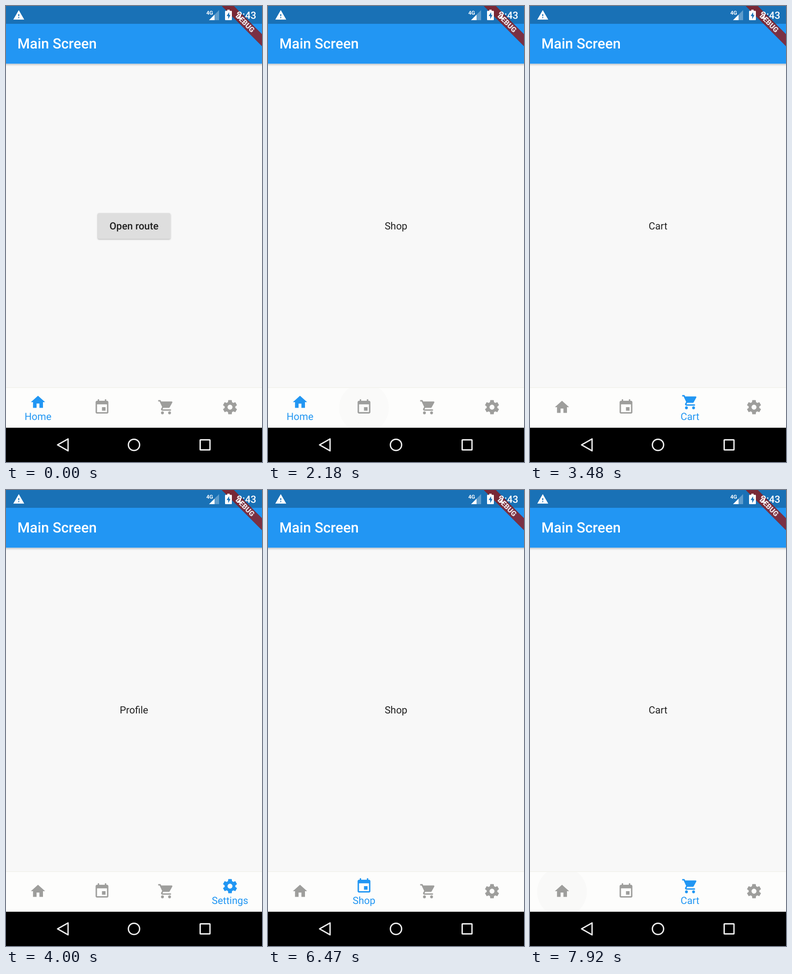
Write an HTML page that moves like this. It is 561 px wide and 998 px high and loops after 8 s.

```html
<!DOCTYPE html>
<html lang="en">
<head>
<meta charset="utf-8">
<title>Bottom navigation</title>
<style>
  html, body { margin: 0; width: 100%; height: 100%; overflow: hidden; background: #000; }
  svg { display: block; width: 100%; height: 100%; font: 21.82px Roboto, sans-serif; text-rendering: geometricPrecision; }
  .medium { font-weight: 500; }
  .title { font-size: 31.17px; font-weight: 500; fill: #fff; }
  .middle { text-anchor: middle; }
  .body { fill: #202020; }
</style>
</head>
<body>
<svg viewBox="0 0 561 998">
  <defs>
    <filter id="barShadow" x="-5%" y="-20%" width="110%" height="150%">
      <feDropShadow dx="0" dy="2" stdDeviation="2" flood-opacity=".26"/>
    </filter>
    <filter id="buttonShadow" x="-10%" y="-20%" width="120%" height="150%">
      <feDropShadow dx="0" dy="1.5" stdDeviation="1.4" flood-opacity=".32"/>
    </filter>
    <clipPath id="app"><rect width="561" height="923"/></clipPath>
    <clipPath id="navClip"><rect y="836" width="561" height="87"/></clipPath>

    <g id="page">
      <rect width="561" height="923" fill="#f8f8f8"/>
      <rect x="-10" width="581" height="126.2" fill="#2196f3" filter="url(#barShadow)"/>
      <rect width="561" height="39" fill="#1971b6"/>
    </g>
    <rect id="button" x="201" y="453.3" width="159.3" height="56" rx="3" fill="#dedede" filter="url(#buttonShadow)"/>

    <path id="home" d="M10 20v-6h4v6h5v-8h3L12 3 2 12h3v8z"/>
    <path id="shop" d="M17 12h-5v5h5zM16 1v2H8V1H6v2H5c-1.1 0-2 .9-2 2v14c0 1.1.9 2 2 2h14c1.1 0 2-.9 2-2V5c0-1.1-.9-2-2-2h-1V1zm3 18H5V8h14z"/>
    <g id="cart">
      <path d="M1 2v2h2l3.6 7.6L5.25 14C4.5 15.4 5.5 17 7 17h12v-2H7.4c-.2 0-.3-.2-.2-.4L8.1 13h7.45c.75 0 1.4-.4 1.75-1l3.6-6.5C21.25 4.8 20.75 4 20 4H5.2l-.93-2z"/>
      <circle cx="7" cy="20" r="2"/><circle cx="17" cy="20" r="2"/>
    </g>
    <path id="tooth" d="M10 2h4q.45 0 .5.4l.6 4.6H8.9l.6-4.6q.05-.4.5-.4z"/>
    <g id="settings">
      <circle cx="12" cy="12" r="5.5" fill="none" stroke="currentColor" stroke-width="4"/>
    </g>
  </defs>

  <g clip-path="url(#app)">
    <use href="#page"/>
    <text class="title" x="25" y="93.4">Main Screen</text>
    <use id="openButton" href="#button"/>
    <text id="content" class="middle body" x="280.5" y="488.5"></text>
    <rect y="834.5" width="561" height="1.5" fill="#f2f2ec"/>
    <rect y="836" width="561" height="87" fill="#fdfdfc"/>
    <g id="ripples" clip-path="url(#navClip)"></g>
    <g id="tabs"></g>

    <g id="route">
      <use href="#page"/>
      <path d="M47 82.5H28M38 71L27 82.5 38 94" fill="none" stroke="#fff" stroke-width="3.2"/>
      <text class="title" x="112" y="93.4">Second Screen</text>
      <use href="#button"/>
      <text class="middle medium body" x="280.5" y="488.5">Go back!</text>
    </g>

    <g transform="translate(561 0) rotate(45)">
      <rect x="-62.3" y="43.6" width="124.7" height="18.7" opacity=".45"/>
      <rect x="-62.3" y="43.6" width="124.7" height="18.7" fill="#b71c1c" opacity=".627"/>
      <text class="middle" y="57.8" font-size="15.9" font-weight="900" fill="#ece3e6">DEBUG</text>
    </g>
  </g>

  <g fill="#fff">
    <path transform="translate(14.9 6.9) scale(1.09)" d="M1 21h22L12 2zm12-3h-2v-2h2zm0-4h-2v-4h2z"/>
    <text x="439" y="18.5" font-size="11.7" font-weight="700">4G</text>
    <path d="M467 9V31H445z" opacity=".3"/>
    <path d="M457 19V31H445z"/>
    <path d="M485 8h5v2.5h3.5q1.5 0 1.5 1.5V29.5q0 1.5-1.5 1.5h-12q-1.5 0-1.5-1.5V12q0-1.5 1.5-1.5H485z"/>
    <path d="M489 13.5L483.5 22H487V28.5L492 19.5H489z" fill="#1971b6"/>
    <text class="medium" x="505.5" y="28">2:43</text>
  </g>

  <rect y="923" width="561" height="75"/>
  <g fill="none" stroke="#ececec" stroke-width="3">
    <path d="M113 960.5L136 947.5V973.5z" stroke-linejoin="round"/>
    <circle cx="280.5" cy="960.5" r="12.3"/>
    <rect x="425.5" y="949.5" width="21.5" height="22" rx="1"/>
  </g>
</svg>

<script>
const LOOP = 8000, DP = 561 / 360;
const GREY = [158, 158, 156], BLUE = [33, 150, 243];
const LABELS = ['Home', 'Shop', 'Cart', 'Settings'];
const CONTENT = ['Open route', 'Shop', 'Cart', 'Profile'];

// Each tap highlights its tab at `down` and selects it at `up`.
const TAPS = [
  { tab: 1, down: 2110, up: 2170 },
  { tab: 2, down: 2880, up: 2915 },
  { tab: 3, down: 3650, up: 3700 },
  { tab: 1, down: 4460, up: 4765 },
  { tab: 2, down: 6640, up: 6668 },
  { tab: 0, down: 7840, up: LOOP },
];
const HOLDS = [[2180, 2300], [2340, 2720], [3100, 3480], [4920, 6470]];

const $ = id => document.getElementById(id);
const clamp = x => Math.min(1, Math.max(0, x));

function add(parent, tag, attributes, text = '') {
  const node = document.createElementNS('http://www.w3.org/2000/svg', tag);
  for (const key in attributes) node.setAttribute(key, attributes[key]);
  node.textContent = text;
  return parent.appendChild(node);
}

function bezier(x1, y1, x2, y2) {
  const at = (a, b, u) => 3 * a * u * (1 - u) ** 2 + 3 * b * u * u * (1 - u) + u ** 3;
  return x => {
    let low = 0, high = 1;
    for (let i = 0; i < 20; i++) {
      const mid = (low + high) / 2;
      if (at(x1, x2, mid) < x) low = mid; else high = mid;
    }
    return x <= 0 ? 0 : x >= 1 ? 1 : at(y1, y2, low);
  };
}
const fastOutSlowIn = bezier(.4, 0, .2, 1);
const easeIn = bezier(.42, 0, 1, 1);

for (let angle = 0; angle < 360; angle += 60)
  add($('settings'), 'use', { href: '#tooth', transform: `rotate(${angle} 12 12)` });

const tabs = LABELS.map((name, i) => {
  const x = 561 / 8 * (2 * i + 1);
  return {
    x,
    ripple: add($('ripples'), 'circle', { cx: x, cy: 879.5, r: 35 * DP, fill: '#bcbcbc' }),
    icon: add($('tabs'), 'use', { href: '#' + name.toLowerCase() }),
    label: add($('tabs'), 'text', { class: 'middle', y: 6.8 }, name),
  };
});

function drawTab(tab, selected, ripple) {
  const drop = 11 * (1 - selected);
  const color = `rgb(${GREY.map((g, i) => g + (BLUE[i] - g) * selected)})`;
  tab.icon.setAttribute('transform', `translate(${tab.x - 12 * DP} ${867 + drop - 12 * DP}) scale(${DP})`);
  tab.label.setAttribute('transform', `translate(${tab.x} ${899 + drop}) scale(${(12 + 2 * selected) / 14})`);
  tab.icon.style.color = tab.icon.style.fill = tab.label.style.fill = color;
  tab.label.style.opacity = selected;
  tab.ripple.style.opacity = ripple;
}

function draw(time) {
  const hold = HOLDS.find(([from, to]) => time >= from && time < to);
  const t = hold ? hold[0] : time;

  const selected = [1, 0, 0, 0], ripples = [0, 0, 0, 0];
  let current = 0;
  for (const { tab, down, up } of TAPS) {
    if (t >= down) ripples[tab] = .4 * clamp((t - down) / 200) ** 2 * clamp(1 - (t - up) / 240);
    if (t < up) continue;
    const progress = fastOutSlowIn((t - up) / 200);
    selected[current] = 1 - progress;
    selected[tab] = progress;
    current = tab;
  }
  tabs.forEach((tab, i) => drawTab(tab, selected[i], ripples[i]));

  $('content').textContent = CONTENT[current];
  $('content').classList.toggle('medium', current === 0);
  $('openButton').style.display = current === 0 ? '' : 'none';

  const open = clamp((t - 40) / 290) * clamp(1 - (t - 540) / 300);
  $('route').style.opacity = easeIn(open);
  $('route').style.display = open ? '' : 'none';
  $('route').setAttribute('transform', `translate(0 ${923 / 4 * (1 - fastOutSlowIn(open))})`);
}

const start = performance.now();
function tick() {
  draw((performance.now() - start) % LOOP);
  requestAnimationFrame(tick);
}
tick();
</script>
</body>
</html>
```
